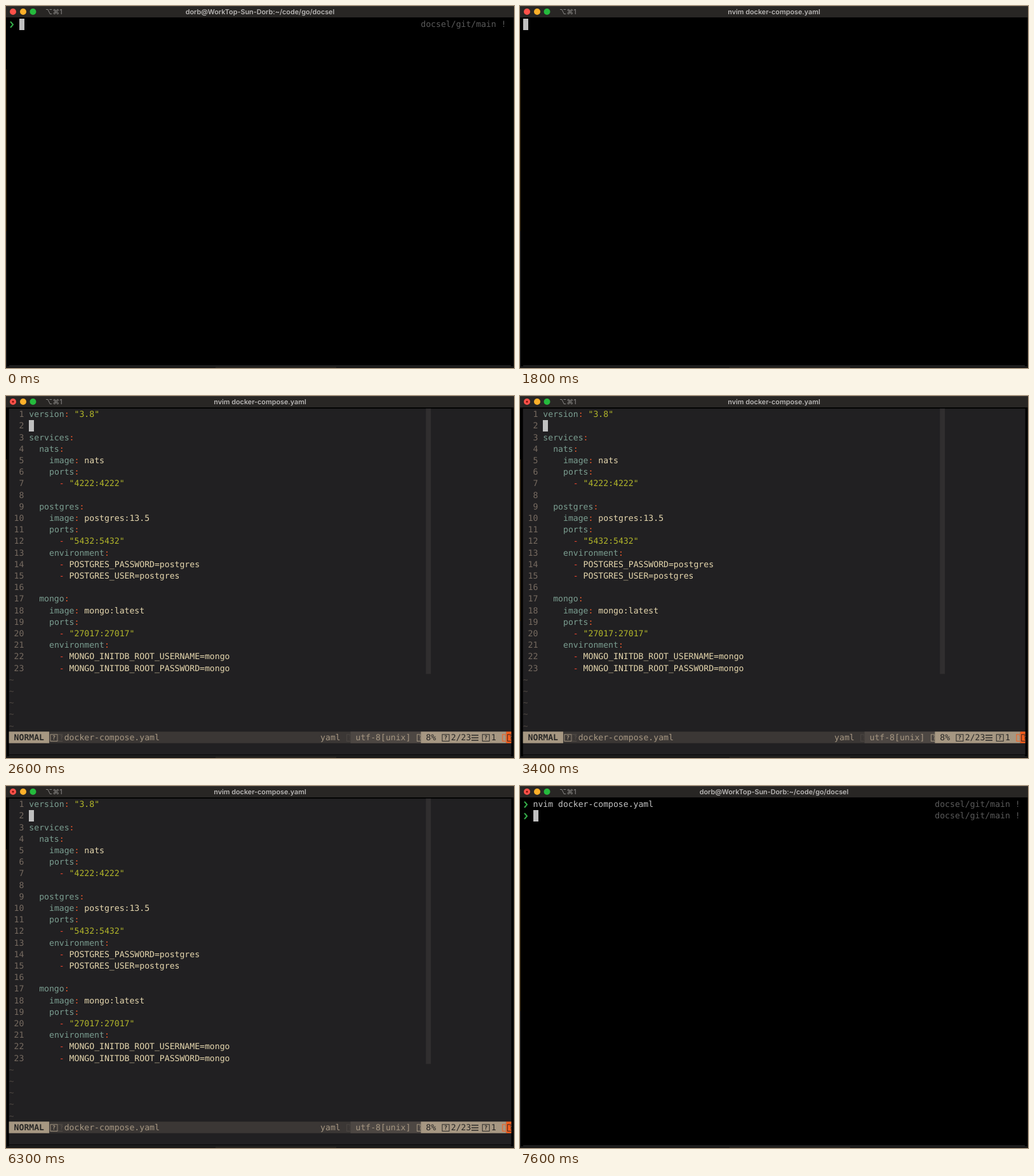
Write an HTML page with a canvas that moves like this. It is 800 px wide and 571 px high and loops after 8 s.

```html
<!DOCTYPE html>
<html lang="en">
<head>
<meta charset="utf-8">
<title>Terminal session</title>
<style>
  html, body { margin: 0; width: 100%; height: 100%; overflow: hidden; background: #000; }
  canvas { display: block; width: 800px; height: 571px; }
</style>
</head>
<body>
<canvas id="stage" width="800" height="571"></canvas>
<script>
const ctx = document.getElementById('stage').getContext('2d');
const LOOP = 8000;
const CELL_W = 7.91, CELL_H = 18.2, LEFT = 4.7, TOP = 19.8;
const MONO = '13.14px "DejaVu Sans Mono", monospace';
const SHELL_TITLE = 'dorb@WorkTop-Sun-Dorb:~/code/go/docsel';
const COMMAND = 'nvim docker-compose.yaml';
const FILE = 'docker-compose.yaml';

const color = {
  bar: '#282624', title: '#b9b7b6', shell: '#c4c4c4', hint: '#5a5a5a', cursor: '#c0c0c0',
  bg: '#212022', text: '#e6d7ae', key: '#7b9e91', mark: '#ee5a2c', dash: '#ec4530',
  string: '#b2b62a', number: '#766a60', tilde: '#4d4641', ruler: '#302e2f',
  tan: '#a69782', dark: '#282726', status: '#3b3735', mid: '#4d4743', orange: '#f95e1c'
};

const YAML = `version: "3.8"

services:
  nats:
    image: nats
    ports:
      - "4222:4222"

  postgres:
    image: postgres:13.5
    ports:
      - "5432:5432"
    environment:
      - POSTGRES_PASSWORD=postgres
      - POSTGRES_USER=postgres

  mongo:
    image: mongo:latest
    ports:
      - "27017:27017"
    environment:
      - MONGO_INITDB_ROOT_USERNAME=mongo
      - MONGO_INITDB_ROOT_PASSWORD=mongo`.split('\n');

// Time and number of command characters on screen
const TYPING = [[0, 0], [400, 1], [500, 2], [600, 3], [800, 4], [900, 5],
  [1000, 6], [1100, 7], [1300, 8], [1400, 9], [1500, 25]];

const colX = col => LEFT + col * CELL_W;
const rowY = row => TOP + row * CELL_H;

function rect(x, y, w, h, fill) {
  ctx.fillStyle = fill;
  ctx.fillRect(x, y, w, h);
}

function cells(col, row, count, fill) {
  rect(colX(col), rowY(row), count * CELL_W, CELL_H, fill);
}

function write(text, col, row, fill, weight = '') {
  ctx.font = weight + ' ' + MONO;
  ctx.fillStyle = fill;
  ctx.fillText(text, colX(col), rowY(row) + 13.4);
}

function cursor(col, row) {
  rect(Math.round(colX(col)), Math.round(rowY(row)), 8, 18, color.cursor);
}

function dot(x, y, r, fill) {
  ctx.fillStyle = fill;
  ctx.beginPath();
  ctx.arc(x, y, r, 0, Math.PI * 2);
  ctx.fill();
}

function drawWindow(title, busy) {
  rect(0, 0, 800, 571, '#000');
  rect(0, 0, 800, 18, color.bar);
  rect(0, 0, 800, 1, '#383634');
  rect(0, 100, 1, 255, '#39290f');
  rect(0, 355, 1, 216, '#242526');
  rect(799, 18, 1, 550, '#1c1c1c');
  rect(0, 568, 800, 3, '#171717');
  rect(5, 567, 790, 1, '#303030');
  rect(330, 569, 190, 2, '#25231f');

  dot(11, 9, 5, '#ff5149');
  dot(27, 9, 5, '#fdb02a');
  dot(42.5, 9, 5, '#25bb3d');
  if (busy) dot(11, 9, 1.6, '#7a0e0a');

  ctx.font = '11px Inter, "DejaVu Sans", sans-serif';
  ctx.fillStyle = '#8b8987';
  ctx.fillText('⌥⌘1', 62, 13);
  ctx.font = '600 10.8px Inter, sans-serif';
  ctx.fillStyle = color.title;
  ctx.textAlign = 'center';
  ctx.fillText(title, 400, 12.5);
  ctx.textAlign = 'left';
}

function drawPrompt(row, text) {
  const y = rowY(row);
  ctx.strokeStyle = '#35b04a';
  ctx.lineWidth = 2;
  ctx.beginPath();
  ctx.moveTo(7, y + 4.8);
  ctx.lineTo(11, y + 9.5);
  ctx.lineTo(7, y + 14.2);
  ctx.stroke();
  write(text, 2, row, color.shell);
  write('docsel/git/main !', 82, row, color.hint);
}

function drawYamlLine(line, row) {
  write(String(row + 1).padStart(3), 0, row, color.number);
  const [, indent, dash, body] = line.match(/^( *)(- )?(.*)$/);
  let col = 4 + indent.length;
  const put = (text, fill) => {
    write(text, col, row, fill);
    col += text.length;
  };
  const value = text => put(text, text.startsWith('"') ? color.string : color.text);
  if (dash) {
    put(dash, color.dash);
    value(body);
  } else if (body) {
    const [key, rest] = body.split(/:(?: |$)/);
    put(key, color.key);
    put(': ', color.mark);
    value(rest);
  }
}

// Placeholder box for a glyph the font lacks
function missing(col, width, fill) {
  const x = colX(col) + 1.5, y = rowY(28) + 4;
  ctx.save();
  ctx.beginPath();
  ctx.rect(x - 1, y - 1, width, 14);
  ctx.clip();
  ctx.strokeStyle = fill;
  ctx.lineWidth = 1;
  ctx.strokeRect(x + 0.5, y + 0.5, 11, 10.5);
  ctx.font = 'bold 9px "DejaVu Sans Mono", monospace';
  ctx.fillStyle = fill;
  ctx.fillText('?', x + 3.3, y + 9);
  ctx.restore();
}

function drawStatus(mode, line) {
  const row = 28, end = mode.length + 2;
  cells(0, row, 100, color.status);
  cells(0, row, end, color.tan);
  write(mode, 1, row, color.dark, 'bold');
  missing(end, 14, color.tan);
  missing(end + 1.5, 9, '#57504a');
  write(FILE, end + 3, row, color.tan);
  write('yaml', 62, row, color.tan);
  missing(67, 7, color.mid);
  cells(68, row, 14, color.mid);
  write('utf-8[unix]', 69, row, color.tan);
  missing(81, 7.5, color.tan);
  cells(82, row, 17, color.tan);
  write(Math.floor(line / YAML.length * 100) + '%', 83, row, color.dark);
  missing(86, 14, color.dark);
  write(line + '/' + YAML.length, 88, row, color.dark);
  for (let i = 0; i < 3; i++) rect(733, rowY(row) + 5 + i * 4, 11, 1.4, color.dark);
  missing(94, 14, color.dark);
  write('1', 96, row, color.dark);
  missing(98, 7, color.orange);
  cells(99, row, 1, color.orange);
  missing(99, 9, color.dark);
}

function drawEditor(line, command) {
  rect(LEFT, TOP, 100 * CELL_W, 30 * CELL_H, color.bg);
  cells(83, 0, YAML.length, 'transparent');
  rect(colX(83), TOP, CELL_W, YAML.length * CELL_H, color.ruler);
  if (!command) cursor(4, line - 1);
  YAML.forEach(drawYamlLine);
  if (line === 1 && !command) {
    cursor(4, 0);
    write('v', 4, 0, '#8e9a95');
  }
  for (let row = YAML.length; row < 28; row++) write('~', 0, row, color.tilde);
  drawStatus(command ? 'COMMAND' : 'NORMAL', line);
  if (command) {
    write(command, 0, 29, color.text);
    cursor(command.length, 29);
  }
}

function render(t) {
  const editing = t >= 1700 && t < 7600;
  drawWindow(editing ? COMMAND : SHELL_TITLE, t >= 2600);

  if (t < 1700) {
    const count = TYPING.filter(([start]) => start <= t).pop()[1];
    drawPrompt(0, COMMAND.slice(0, count));
    cursor(2 + count, 0);
  } else if (t < 1800) {
    drawPrompt(0, COMMAND);
    cursor(0, 1);
  } else if (t < 1900) {
    cursor(0, 0);
  } else if (t < 7600) {
    drawEditor(t < 2600 ? 1 : 2, t < 7200 ? '' : t < 7400 ? ':' : ':q');
  } else {
    drawPrompt(0, COMMAND);
    drawPrompt(1, '');
    cursor(2, 1);
  }
}

ctx.textRendering = 'geometricPrecision';
const begin = performance.now();
function tick() {
  render((performance.now() - begin) % LOOP);
  requestAnimationFrame(tick);
}
tick();
</script>
</body>
</html>
```
